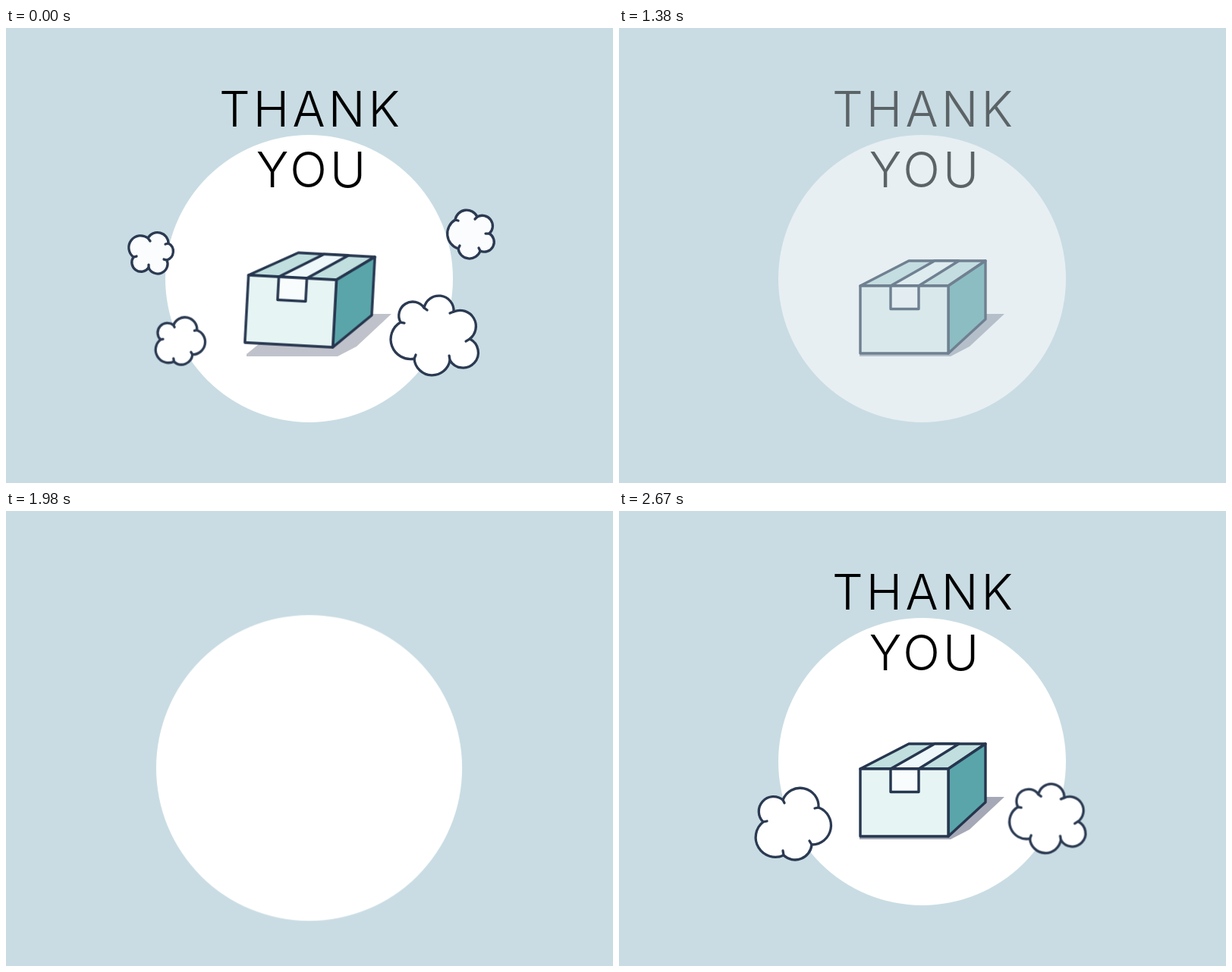
Animation of 800 by 600 pixels, one loop 2700 ms. Source, as an HTML page:

```html
<!DOCTYPE html>
<html lang="en">
<head>
<meta charset="utf-8">
<title>Thank you</title>
<style>
  html, body { margin: 0; width: 100%; height: 100%; overflow: hidden; background: #c9dce3; }
  svg { display: block; width: 100vw; height: 100vh; }

  /* 27 ms of the loop = 1% */
  .scene, .disc, .words, .shadow, .box, .cloud {
    animation-duration: 2.7s;
    animation-iteration-count: infinite;
    animation-timing-function: linear;
  }

  .scene { animation-name: leave; }
  @keyframes leave {
    0%, 46.667% { opacity: 1; }
    56.667% { opacity: 0; animation-timing-function: step-end; }
    60%, 100% { opacity: 1; }
  }

  .disc { fill: #fff; transform-box: fill-box; transform-origin: center; animation-name: pop, lift; }
  @keyframes pop {
    0% { scale: 1; animation-timing-function: step-end; }
    57% { scale: 0; }
    68.333% { scale: 0; animation-timing-function: cubic-bezier(.333, 1.5, .667, 1); }
    78.333%, 100% { scale: 1; }
  }
  @keyframes lift {
    0% { translate: 0 0; animation-timing-function: step-end; }
    57% { translate: 0 34px; }
    68.333% { translate: 0 34px; animation-timing-function: cubic-bezier(.333, .667, .667, 1); }
    78.333%, 100% { translate: 0 0; }
  }

  .words {
    font: 300 64px Inter, "Open Sans", sans-serif;
    letter-spacing: 4.2px;
    text-anchor: middle;
    animation-name: words;
  }
  @keyframes words {
    0% { opacity: 1; animation-timing-function: step-end; }
    57%, 84.074% { opacity: 0; }
    95.185%, 100% { opacity: 1; }
  }

  .shadow { fill: #a5a8b6; animation-name: shade; }
  @keyframes shade {
    0% { opacity: .7; }
    4.444% { opacity: 1; animation-timing-function: step-end; }
    57%, 84.519% { opacity: 0; }
    92.222%, 100% { opacity: 1; }
  }

  .box {
    stroke: #26364f; stroke-width: 3.4; stroke-linejoin: round;
    transform-origin: 400.5px 368px;
    animation-name: drop;
  }
  @keyframes drop {
    0% { transform: translateY(-9.7px) rotate(3.1deg); animation-timing-function: ease-in; }
    4.444% { transform: translateY(0) rotate(0deg); animation-timing-function: step-end; }
    57% { transform: translateY(-315px) rotate(0deg); }
    83.333% {
      transform: translateY(-315px) rotate(0deg);
      animation-timing-function: cubic-bezier(.333, .2, .667, .55);
    }
    92.222%, 100% { transform: translateY(0) rotate(0deg); }
  }

  .cloud {
    fill: #fff; stroke: #2b3a52; stroke-width: 3.3;
    stroke-linecap: round; stroke-linejoin: round;
    transform-box: fill-box; transform-origin: center;
  }
  .cloud path { vector-effect: non-scaling-stroke; }
  .low-left { animation-name: low-left; }
  .low-right { animation-name: low-right; }
  .high { fill: #fafcfe; animation-name: high, thin; }

  @keyframes low-left {
    0% { scale: .66; opacity: 1; }
    5% { scale: .4; opacity: 1; }
    7.778% { scale: .25; opacity: 0; animation-timing-function: step-end; }
    57%, 91.8% { scale: 0; opacity: 1; animation-timing-function: ease-out; }
    98.889%, 100% { scale: 1; opacity: 1; }
  }
  @keyframes low-right {
    0% { scale: 1; opacity: 1; }
    2.222% { scale: 1.05; opacity: 1; }
    7% { scale: .7; opacity: 1; }
    10.5% { scale: .4; opacity: 0; animation-timing-function: step-end; }
    57%, 92.6% { scale: 0; opacity: 1; animation-timing-function: ease-out; }
    98.889%, 100% { scale: .87; opacity: 1; }
  }
  @keyframes high {
    0% { scale: 1; }
    1.667% { scale: 1.04; }
    11.111%, 100% { scale: var(--end); }
  }
  @keyframes thin {
    0%, 5.556% { opacity: 1; }
    11.111% { opacity: .12; animation-timing-function: step-end; }
    40%, 100% { opacity: 0; }
  }
</style>
</head>
<body>
<svg viewBox="0 0 800 600">
  <defs>
    <clipPath id="hole"><circle cx="399.5" cy="330.5" r="189.5"/></clipPath>
  </defs>
  <g class="scene">
    <circle class="disc" cx="399.5" cy="330.5" r="189.5"/>

    <g clip-path="url(#hole)">
      <path class="shadow" d="M317 433V430L382 377H508L462 420L437 433Z"/>
      <g class="box">
        <path fill="#c0dfde" d="M318 340L382 307H483L434 340Z"/>
        <path fill="#eef7f9" d="M358 340L416 307H448L395 340Z"/>
        <path fill="#5aa5a9" d="M434 340L483 307V384L434 429Z"/>
        <path fill="#e6f4f3" d="M318 340H434V429H318Z"/>
        <path fill="#f8fcfd" d="M358 340H395V370.5H358Z"/>
      </g>
    </g>

    <g class="cloud low-left">
      <path d="M216 381A24.3 24.3 0 0 1 263 391A25.3 25.3 0 0 1 254 440A22 22 0 0 1 217 454A26 26 0 0 1 190 410A19.5 19.5 0 0 1 216 381Z"/>
      <path fill="none" d="M263 391l-5 1M254 440l-3-5M217 454l-1-6M190 410l5-1M216 381l2 4"/>
    </g>
    <g class="cloud low-right">
      <path d="M551 369A19.7 19.7 0 0 1 590 374A21 21 0 0 1 611 410A20 20 0 1 1 585 438A23.7 23.7 0 0 1 538 436A26 26 0 0 1 520 388A18.2 18.2 0 0 1 551 369Z"/>
      <path fill="none" d="M590 374l-5 2M611 410l-5 3M585 438l-1-6M538 436l2-5M520 388l5 1M551 369l4 3"/>
    </g>
    <g class="cloud high" style="--end: .36">
      <path d="M187 277A14.4 14.4 0 0 1 214 284A12 12 0 0 1 212 306A13 13 0 0 1 188 316A12.2 12.2 0 0 1 168 302A15.7 15.7 0 0 1 187 277Z"/>
      <path fill="none" d="M187 277l3 4M214 284l-4 1M212 306l-4-1M188 316l0-4M168 302l4-1"/>
    </g>
    <g class="cloud high" style="--end: .5">
      <path d="M592 253A15.3 15.3 0 0 1 621 249A13.7 13.7 0 0 1 637 271A13 13 0 0 1 625 294A15 15 0 0 1 596 291A21 21 0 0 1 592 253Z"/>
      <path fill="none" d="M592 253l4 1M621 249l-3 3M637 271l-5 0M625 294l-2-4M596 291l2-4"/>
    </g>

    <g class="words">
      <text x="402" y="130">THANK</text>
      <text x="404" y="209.5">YOU</text>
    </g>
  </g>
</svg>
</body>
</html>
```
